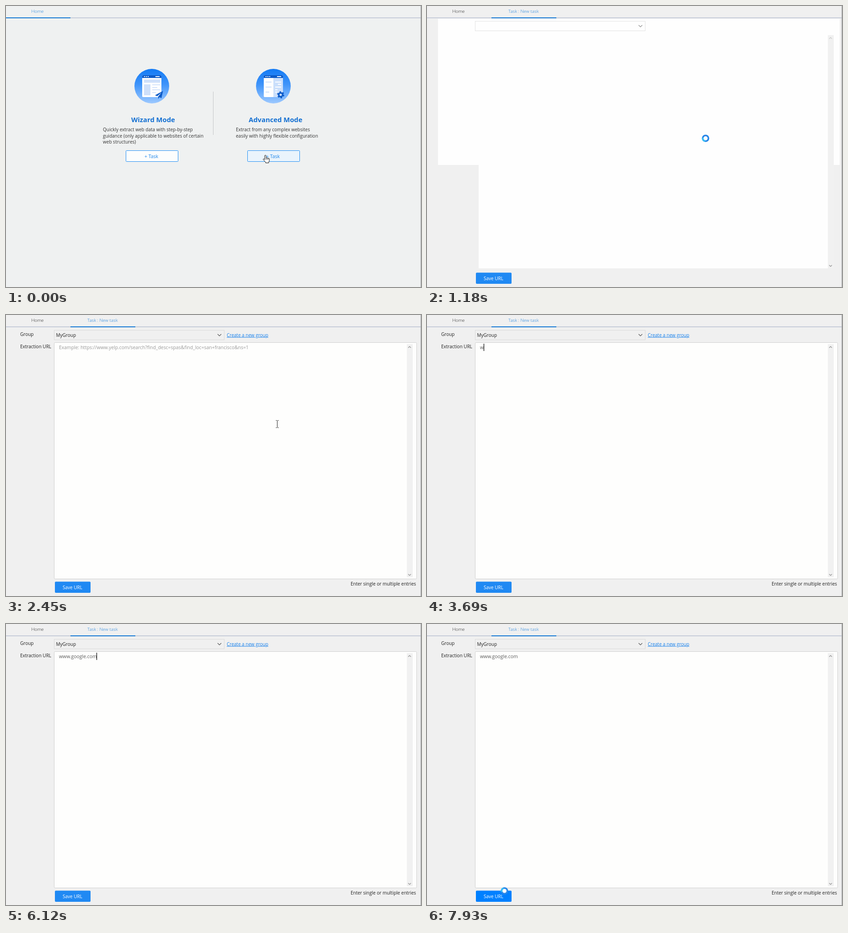
Write an HTML page that moves like this. It is 908 px wide and 617 px high and loops after 8 s.

```html
<!DOCTYPE html>
<html lang="en">
<head>
<meta charset="utf-8">
<title>New task</title>
<style>
  html, body { margin: 0; width: 100%; height: 100%; overflow: hidden; background: #f0f0f0; }
  svg { display: block; width: 908px; height: 617px; }
  text { font: 10px "Open Sans", "Noto Sans", sans-serif; fill: #222; white-space: pre; }
  .tab { font-weight: 300; font-size: 9.9px; }
  .tab.on { fill: #1a7fdc; }
  .head { font-weight: 700; font-size: 14.8px; fill: #1470d2; }
  .note { fill: #333; }
  .task { font-size: 10.5px; fill: #1f86ea; }
  .url { font-size: 10.4px; fill: #5c5c5c; }
  .hint { fill: #999; }
  .link { fill: #1a82ec; text-decoration: underline; }
  .chev { fill: none; stroke: #555; stroke-width: 1.2; }
  .pale { stroke: #c9c9c9; }
  .mid { stroke: #8f8f8f; }
</style>
</head>
<body>
<svg viewBox="0 0 908 617">
  <defs>
    <linearGradient id="sky" x2="0" y2="1">
      <stop stop-color="#127af4"/>
      <stop offset=".45" stop-color="#3f94fa"/>
      <stop offset="1" stop-color="#9dc9ff"/>
    </linearGradient>
    <g id="window">
      <circle r="38" fill="url(#sky)"/>
      <rect x="-21" y="-24" width="42" height="48" rx="2" fill="#fff"/>
      <path d="M-21-18v-4q0-2 2-2h38q2 0 2 2v4z" fill="#0d5cc9"/>
      <path d="M-17-21h2m2 0h2m2 0h2M8-21h9" stroke="#fff" stroke-width="1.8"/>
    </g>
  </defs>

  <rect width="908" height="617" fill="#f0f0f0"/>

  <!-- home page -->
  <g data-on="0-1180">
    <rect width="908" height="617" fill="#eff1f1"/>
    <path d="M453.5 188v95" stroke="#c3c6c8"/>
    <g transform="translate(319 176)">
      <use href="#window"/>
      <path d="M-17-14.500h35v7h-35zM-17-4h14v24h-14z" fill="#cfe0fa"/>
      <path d="M1-3h17M1 3h11M1 8h17M1 14h8" stroke="#d3e3fb" stroke-width="2"/>
      <path d="M24.500 10.500 7 20l5 2 9-8-7 9v5l3-4 4 2.500z" fill="#0d5cc9"/>
    </g>
    <g transform="translate(585 176)">
      <use href="#window"/>
      <path d="M0-18h21v40q0 2-2 2H0z" fill="#cbdffb"/>
      <path d="M-17-9h13M-17 2h13M-17 13h8" stroke="#cfe0fa" stroke-width="2"/>
      <path d="M4-9h13M10-4h7M4 2h13M4 8h5M4 13h5" stroke="#fff" stroke-width="2"/>
      <g transform="translate(16 19)">
        <circle r="6.300" fill="none" stroke="#0d5cc9" stroke-width="3" stroke-dasharray="3.300"/>
        <circle r="4.300" fill="#cbdffb" stroke="#0d5cc9" stroke-width="3.400"/>
      </g>
    </g>
    <text class="head" x="274" y="255">Wizard Mode</text>
    <text class="head" x="531" y="255">Advanced Mode</text>
    <text class="note" x="212" y="275">Quickly extract web data with step-by-step</text>
    <text class="note" x="212" y="288.500">guidance (only applicable to websites of certain</text>
    <text class="note" x="212" y="302">web structures)</text>
    <text class="note" x="503" y="275">Extract from any complex websites</text>
    <text class="note" x="503" y="288.500">easily with highly flexible configuration</text>
    <g stroke="#1f8ef5">
      <rect x="262.500" y="317.500" width="114" height="24" rx="1" fill="#fcfdfd"/>
      <rect x="528.500" y="317.500" width="114" height="24" rx="1" fill="#eaf4fc"/>
    </g>
    <text class="task" x="303" y="333.500">+ Task</text>
    <text class="task" x="569" y="333.500">+ Task</text>
  </g>

  <!-- task page -->
  <g data-on="1180-8000">
    <g fill="#fefefe">
      <path data-on="1180-1330" d="M24 28h879v321h-13v227H113V349H24z"/>
      <rect data-on="1330-2030" x="24" y="28" width="879" height="588"/>
    </g>
    <rect data-on="1480-8000" x="105.500" y="60.500" width="793" height="519" rx="2" fill="#fefefd" stroke="#cfcfcf"/>
    <rect x="877" y="64" width="13" height="512" fill="#f1f1f1"/>
    <path class="chev pale" data-on="1180-2330" d="M880 72l3-3 3 3"/>
    <path class="chev mid" data-on="1180-1480" d="M880 569l3 3 3-3"/>
    <path class="chev pale" data-on="1480-2330" d="M880 569l3 3 3-3"/>
    <path class="chev mid" data-on="2330-8000" d="M880 72l3-3 3 3M880 569l3 3 3-3"/>

    <rect data-on="1180-1480" x="105.500" y="33.500" width="372" height="21" fill="#fefefe" stroke="#e2e2e2"/>
    <rect data-on="1480-8000" x="105.500" y="33.500" width="372" height="21" fill="#f0f0f0" stroke="#dadada"/>
    <path class="chev mid" data-on="1180-1480" d="M463 42l4 4 4-4"/>
    <path class="chev" data-on="1480-8000" d="M463 42l4 4 4-4"/>

    <path data-on="1480-2030" fill="#f1f1f1" d="M28 36h36v13H28zM28 63h73v13H28zM481 37h97v14h-97zM728 584h171v13H728z"/>
    <g data-on="1480-8000">
      <text x="31" y="46">Group</text>
      <text x="31" y="73">Extraction URL</text>
      <text class="link" x="483" y="47.500">Create a new group</text>
      <text x="754" y="594">Enter single or multiple entries</text>
    </g>
    <text data-on="2330-8000" x="109.500" y="47.500">MyGroup</text>
    <text class="url hint" data-on="1480-3690" x="116" y="75">Example: https://www.yelp.com/search?find_desc=spas&amp;find_loc=san+francisco&amp;ns=1</text>
    <text class="url" id="typed" x="116" y="75"></text>
    <path id="caret" data-on="2600-3130 3690-6520 6950-7530" d="M0 63v16" stroke="#111" stroke-width="1.300"/>

    <rect data-on="1180-7530" x="107" y="585.500" width="78" height="24.500" rx="2" fill="#2089f3"/>
    <rect data-on="7530-8000" x="107" y="585.500" width="78" height="24.500" rx="2" fill="#0080ff"/>
    <text x="124" y="601.500" style="fill:#fff">Save URL</text>

    <g data-on="1730-2330">
      <circle cx="463" cy="323" r="32" fill="#0092ff"/>
      <text x="438" y="370" style="font-size:13.200px;fill:#000;font-weight:500">Loading</text>
    </g>
  </g>

  <!-- tab strip and window edge -->
  <path d="M0 26h908" stroke="#b9c0d2" stroke-width="1.300"/>
  <g data-on="0-1180">
    <text class="tab on" x="55.500" y="14.500">Home</text>
    <path d="M0 26h141" stroke="#1478d4" stroke-width="2"/>
  </g>
  <g data-on="1180-8000">
    <text class="tab" x="55.500" y="14.500">Home</text>
    <text class="tab on" x="178" y="14.500">Task : New task</text>
    <path d="M141 26h142" stroke="#1478d4" stroke-width="2"/>
  </g>
  <path d="M907.500 0v617" stroke="#a8abad"/>

  <!-- pointers, each drawn around its hot spot -->
  <g id="hand" fill="#fff" stroke="#111" stroke-linejoin="round">
    <path d="M-1.500 10V1.500q0-1.500 1.500-1.500t1.500 1.500V6q1.400-1 2.500.3 1.300-.8 2.400.5 2-.5 2.300 1.400V12l-1.500 3.500V17H.500v-1.500L-4.500 10q-.8-1.600.4-2 1.100-.2 2.600 2z"/>
    <path d="M1.500 6v4M4 6.500V10M6.400 7v3" stroke-width=".8"/>
  </g>
  <path id="arrow" d="M0 0v13l3-2.800 2 4.800 2-.8-2-4.700h4z" fill="#fff" stroke="#111"/>
  <path id="beam" d="M-3-8h2l1 1 1-1h2M0-7V7M-3 8h2l1-1 1 1h2" fill="none" stroke="#222"/>
  <g id="ring" fill="none" stroke-width="3.600">
    <circle r="6.300" fill="#fff" stroke="#2a87e8"/>
    <path id="glint" d="M-6.300 0A6.300 6.300 0 0 1 0-6.300" stroke="#35bff5"/>
  </g>
</svg>

<script>
const LOOP = 8000;
const URL_TEXT = 'www.google.com';
const KEYS = [3690, 3970, 4150, 4330, 4510, 4700, 4880, 5020, 5190, 5360, 5520, 5690, 5970, 6120];

// time, pointer, x, y, turn of the ring
const POINTER = [
  [0, 'hand', 567.5, 327.5],
  [1030, 'ring', 569, 327, 0],
  [1180, 'ring', 609.5, 290.5, -80],
  [1480, 'ring', 609.5, 288, 120],
  [1730, 'ring', 609.5, 281.5, 200],
  [1880, 'ring', 609.5, 281.5, -20],
  [2030, 'ring', 609.5, 281.5, 60],
  [2180, 'ring', 608, 276, 140],
  [2330, 'beam', 601.5, 258.5],
  [2450, 'beam', 593.5, 239.5],
  [3690, ''],
  [6950, 'beam', 492.5, 322.5],
  [7110, 'beam', 385.5, 422.5],
  [7260, 'beam', 285.5, 514.5],
  [7400, 'arrow', 214.5, 581.5],
  [7530, 'hand', 178.5, 590.5],
  [7660, 'hand', 170.5, 587],
  [7810, 'ring', 169.5, 586, -90],
  [7930, 'ring', 169.5, 586, -20]
];

const byId = id => document.getElementById(id);
const typed = byId('typed'), caret = byId('caret'), glint = byId('glint');
const pointers = ['hand', 'arrow', 'beam', 'ring'].map(byId);
const timed = [...document.querySelectorAll('[data-on]')].map(el => ({
  el, spans: el.dataset.on.split(' ').map(s => s.split('-').map(Number))
}));

const show = (el, on) => { el.style.display = on ? '' : 'none'; };

function render(t) {
  for (const { el, spans } of timed) show(el, spans.some(([a, b]) => t >= a && t < b));

  const text = URL_TEXT.slice(0, KEYS.filter(k => k <= t).length);
  if (typed.textContent !== text) typed.textContent = text;
  const width = text ? typed.getComputedTextLength() : 0;
  caret.setAttribute('transform', `translate(${Math.floor(116 + width) + 0.5})`);

  const [, kind, x, y, turn] = POINTER.findLast(p => p[0] <= t);
  for (const el of pointers) {
    show(el, el.id === kind);
    if (el.id === kind) el.setAttribute('transform', `translate(${x} ${y})`);
  }
  if (kind === 'ring') glint.setAttribute('transform', `rotate(${turn})`);
}

const start = performance.now();
function tick() {
  render((performance.now() - start) % LOOP);
  requestAnimationFrame(tick);
}
tick();
</script>
</body>
</html>
```
